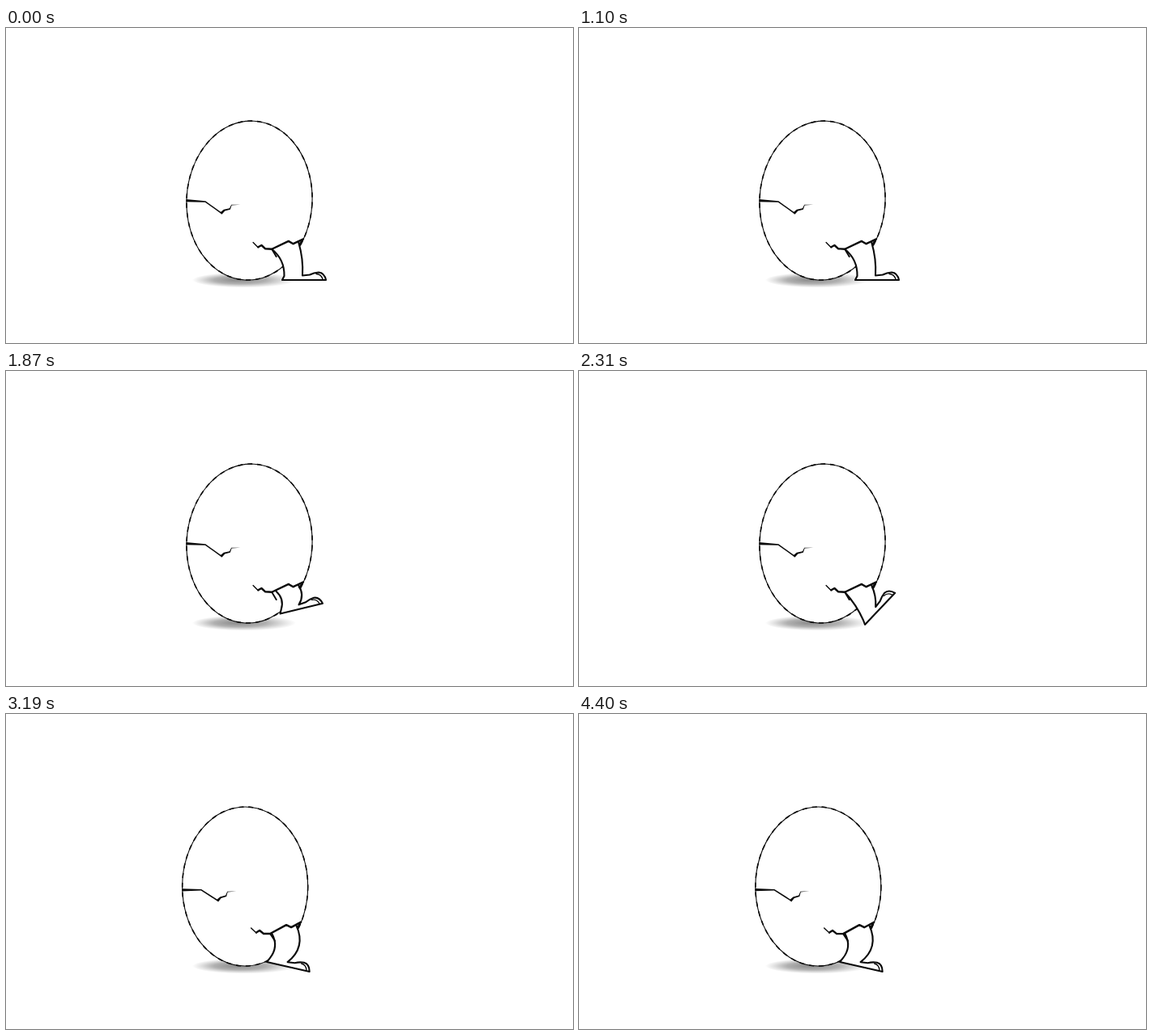
Animation of 700 by 390 pixels, one loop 4.84 s. Source, as an HTML page:

```html
<!DOCTYPE html>
<html lang="en">
<head>
<meta charset="utf-8">
<title>Hatching egg</title>
<style>
  html, body { margin: 0; width: 100%; height: 100%; overflow: hidden; background: #fff; }
  svg { display: block; width: 700px; height: 390px; }
  .line { fill: none; stroke: #0a0a0a; stroke-linecap: round; stroke-linejoin: round; }
  .solid { fill: #0a0a0a; }
</style>
</head>
<body>
<svg viewBox="0 0 700 390">
  <defs>
    <radialGradient id="shade" fx=".42">
      <stop offset="0" stop-color="#8c8c8c"/>
      <stop offset=".5" stop-color="#b0b0b0"/>
      <stop offset=".8" stop-color="#e2e2e2"/>
      <stop offset="1" stop-color="#fff"/>
    </radialGradient>
  </defs>
  <ellipse cx="294" cy="312" rx="64" ry="9.500" fill="url(#shade)"/>
  <g class="tilt">
    <ellipse cx="295" cy="213.5" rx="77.5" ry="98.5" fill="#fff" stroke="#0a0a0a" stroke-width="1.1"/>
    <ellipse class="line" cx="295" cy="213.5" rx="77.5" ry="98.5" stroke-width="1.6" stroke-dasharray="5 7"/>
  </g>
  <path id="leg" class="line" style="fill:#fff" stroke-width="2.1"/>
  <path id="nail" class="line" stroke-width="1.3"/>
  <g class="tilt">
    <path class="solid" d="M217 216.3L241 217.200 260.500 229.500 264 226.500 271 224.600 273 219.800 284 219.400 273.500 220.600 272 226 265.500 228 262 232.500 259 230.500 240.500 218.600 217 219.600Z"/>
    <path class="line" stroke-width="1.4" d="M302.500 265L309 271"/>
    <path class="line" stroke-width="2.4" d="M309 270.500L313 268 318 272 326 272 346 261 352 264 364 257.500"/>
    <path class="line" stroke-width="1.9" d="M326 272L332 281M363 258.500L359.500 264.500"/>
  </g>
</svg>
<script>
const STEP = 110, LOOP = 4840, PIVOT = [296, 312];

// Keys: step, heel x, heel y, sole angle, egg tilt
const kick = [
  [0, 341, 312, 0, 3.2],
  [2, 329, 297, 56, 3.2],
  [4, 315, 291, 38.5, 3.2],
  [6, 325, 294, 10.9, 3.2],
  [8, 352, 307, -38, 3.2],
  [10, 341, 312, 0, 3.2]
];
const settle = [
  [20, 341, 312, 0, 3.2],
  [21, 353, 314, -46.5, 3.2],
  [25, 335, 311, -7.4, 0],
  [27, 328, 304, 26, -0.8],
  [29, 322, 307, 12.8, 0.1],
  [32, 322, 307, 12.8, 0.1],
  [35, 322, 307, 12.8, 0.8],
  [37, 322, 307, 14, 0],
  [40, 322, 307, 12.8, 0.2]
];

function sample(keys, step) {
  const next = keys.findIndex(k => k[0] > step);
  if (next < 0) return keys[keys.length - 1].slice(1);
  const a = keys[next - 1], b = keys[next];
  const u = (step - a[0]) / (b[0] - a[0]);
  return a.map((v, i) => v + (b[i] - v) * u).slice(1);
}

function rotate([x, y], deg) {
  const r = deg * Math.PI / 180, c = Math.cos(r), s = Math.sin(r);
  return [x * c - y * s, x * s + y * c];
}

const add = (a, b) => [a[0] + b[0], a[1] + b[1]];

// Segment from a to b whose middle bulges forward by the given amount
function bow(a, b, bulge) {
  const dx = b[0] - a[0], dy = b[1] - a[1], k = 2 * bulge / Math.hypot(dx, dy);
  return `Q${(a[0] + b[0]) / 2 + dy * k} ${(a[1] + b[1]) / 2 - dx * k} ${b}`;
}

const leg = document.getElementById('leg');
const nail = document.getElementById('nail');
const tilted = document.querySelectorAll('.tilt');

function draw(step) {
  const [x, y, angle, tilt] = step < 20 ? sample(kick, step % 10) : sample(settle, step);
  const foot = (u, v) => add([x, y], rotate([u, v], angle));
  const onEgg = (u, v) => add(PIVOT, rotate([u - PIVOT[0], v - PIVOT[1]], tilt));

  // A lifted heel slides the hip along the crack; a steep foot bends its sole
  const lift = Math.max(0, 311 - y) / 2;
  const curl = Math.max(0, angle - 13) / 4;
  const back = onEgg(326 + lift, 272 - lift / 4), front = onEgg(358.5, 262);
  const heel = foot(2.5, -5), ankle = foot(25, -5.5 + curl * 0.8);

  leg.setAttribute('d', `M${back}${bow(back, heel, 4.5 + angle * 0.06)}L${foot(0, 0)}` +
    `Q${foot(21, curl * 2)} ${foot(54 - curl / 2, 0)}` +
    `Q${foot(52, -9)} ${foot(45, -9.5)}Q${foot(39, -9)} ${foot(34, -6.5)}L${ankle}` +
    bow(ankle, front, (ankle[0] - front[0]) * 0.45 - 4).replace('Q', 'Q'));
  nail.setAttribute('d', `M${foot(42, -7.5)}Q${foot(48, -7.5)} ${foot(50, -1)}`);
  tilted.forEach(g => g.setAttribute('transform', `rotate(${tilt} ${PIVOT.join(' ')})`));
}

const start = performance.now();
function tick() {
  draw(Math.floor((performance.now() - start) % LOOP / STEP));
  requestAnimationFrame(tick);
}
tick();
</script>
</body>
</html>
```
